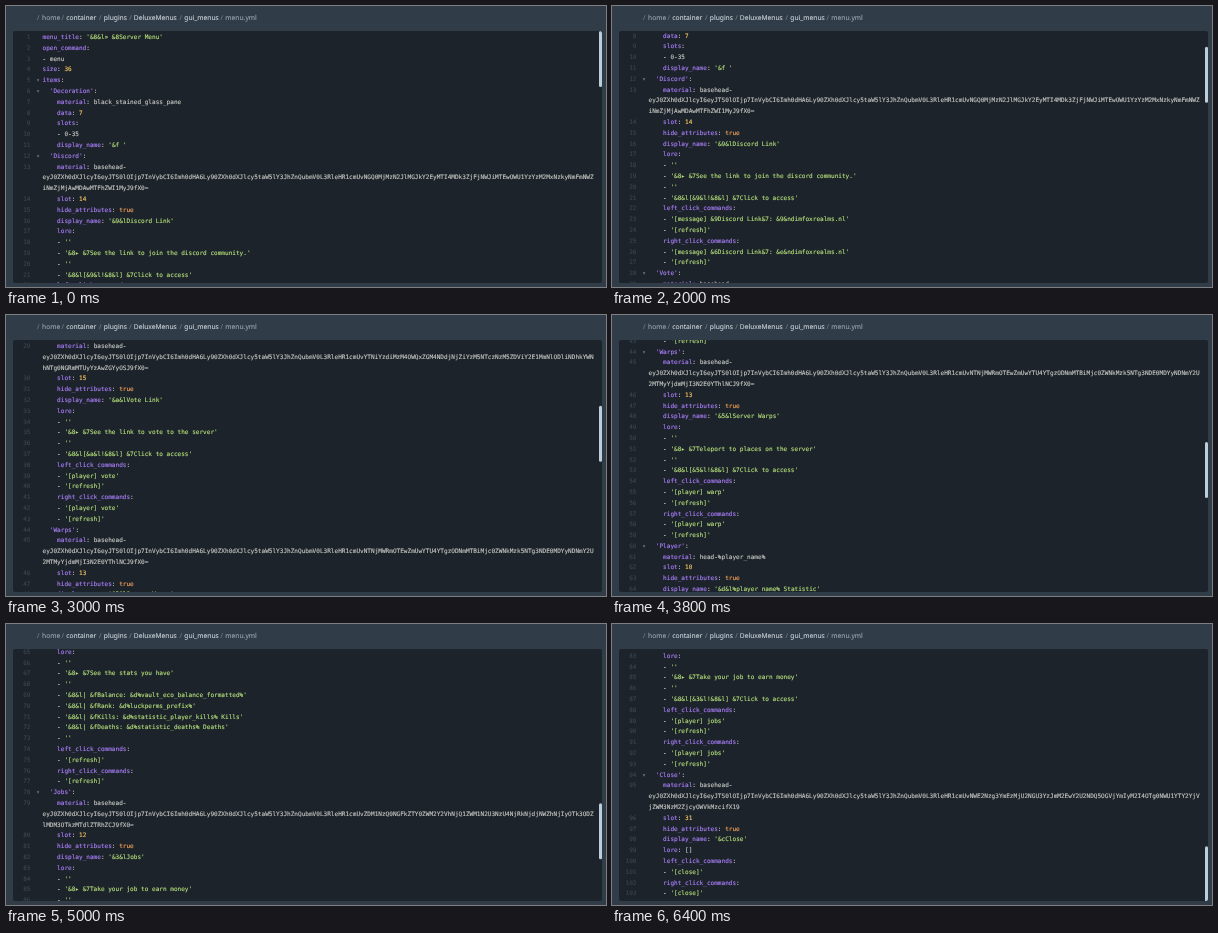
Write an HTML page that moves like this. It is 600 by 281 pixels and loops after 6600 ms.

```html
<!DOCTYPE html>
<html lang="en">
<head>
<meta charset="utf-8">
<title>menu.yml</title>
<style>
  @property --scroll { syntax: "<number>"; inherits: true; initial-value: 0; }

  html, body { margin: 0; width: 100%; height: 100%; overflow: hidden; background: #303c47; }

  #stage {
    position: relative; width: 600px; height: 281px; overflow: hidden;
    background: #303c47; text-rendering: geometricPrecision;
    -webkit-text-stroke: .12px;
    animation: scroll 6600ms infinite;
  }

  #path span {
    position: absolute; top: 7.1px; white-space: pre;
    font: 6.7px/10px "Noto Sans", "Open Sans", sans-serif; color: #cad1d8;
  }
  #path .dim { color: #97a3af; }
  #path .slash { color: #72808d; }

  #editor {
    position: absolute; left: 7px; top: 24.5px; width: 588.6px; height: 252.5px;
    overflow: hidden; border-radius: 2px; background: #1c232b;
  }
  #code {
    padding-top: 2.6px;
    font: 6.07px/10.8px "DejaVu Sans Mono", monospace; color: #cbccc6;
    transform: translateY(calc(var(--scroll) * -1px));
  }
  .row { position: relative; height: 10.8px; padding-left: 29.5px; white-space: pre; }
  .num { position: absolute; left: 0; width: 17.5px; text-align: right; color: #3b4650; }
  .fold { position: absolute; left: 23.2px; color: #707b84; }
  .late { animation: appear 6600ms step-end infinite; }
  .key { color: #ae81ff; }
  .str { color: #bae67e; }
  .int { color: #ffcc66; }
  .bool { color: #ffa759; }

  #thumb {
    position: absolute; right: 0; top: .9px; width: 3px; height: 55.3px;
    border-radius: 1.5px; background: #bccedb;
    transform: translateY(calc(var(--scroll) * .203px));
  }

  /* The view advances once every 100 ms. */
  @keyframes scroll {
    0%       { --scroll: 0; animation-timing-function: step-end; }
    19.6969% { --scroll: 0; animation-timing-function: steps(4); }
    25.7575% { --scroll: 27; animation-timing-function: steps(3); }
    30.3030% { --scroll: 77.3; animation-timing-function: steps(10); }
    45.4545% { --scroll: 324; animation-timing-function: steps(8); }
    57.5757% { --scroll: 502; animation-timing-function: steps(8); }
    69.6969% { --scroll: 659; animation-timing-function: steps(8); }
    81.8181% { --scroll: 860; animation-timing-function: steps(5); }
    89.3939%, 100% { --scroll: 971.3; animation-timing-function: step-end; }
  }
  @keyframes appear {
    0% { opacity: 0; }
    50%, 100% { opacity: 1; }
  }
</style>
</head>
<body>
<div id="stage">
  <div id="path"></div>
  <div id="editor">
    <div id="code"></div>
    <div id="thumb"></div>
  </div>
</div>
<script>
  const skinStart = "eyJ0ZXh0dXJlcyI6eyJTS0lOIjp7InVybCI6Imh0dHA6Ly90ZXh0dXJlcy5taW5lY3JhZnQubmV0L3RleHR1cmUv";
  const site = "dimfoxrealms.nl";

  // "~" marks the continuation of a wrapped line.
  const skin = (first, rest) => ["material: basehead-", "~" + skinStart + first, "~" + rest];
  const base = (slot, name) => [`slot: ${slot}`, "hide_attributes: true", `display_name: '${name}'`];
  const list = (key, ...values) => [`${key}:`, ...values.map(v => `- '${v}'`)];
  const lore = (text, color) =>
    list("lore", "", `&8▸ &7${text}`, "", `&8&l[&${color}&l!&8&l] &7Click to access`);
  const clicks = (left, right = left) => [
    ...list("left_click_commands", ...left),
    ...list("right_click_commands", ...right)
  ];
  const item = (name, ...parts) => [
    `  '${name}':`,
    ...parts.flat().map(s => s[0] === "~" ? s : "    " + s)
  ];
  const run = command => clicks([`[player] ${command}`, "[refresh]"]);

  const lines = [
    "menu_title: '&8&l» &8Server Menu'",
    "open_command:",
    "- menu",
    "size: 36",
    "items:",
    ...item("Decoration", "material: black_stained_glass_pane", "data: 7",
      "slots:", "- 0-35", "display_name: '&f '"),
    ...item("Discord",
      skin("NGQ0MjMzN2JlMGJkY2EyMTI4MDk3ZjFjNWJiMTEwOWU1YzYzM2MxNzkyNmFmNWZ",
        "iNmZjMjAwMDAwMTFhZWI1MyJ9fX0="),
      base(14, "&9&lDiscord Link"),
      lore("See the link to join the discord community.", 9),
      clicks([`[message] &9Discord Link&7: &9&n${site}`, "[refresh]"],
        [`[message] &6Discord Link&7: &e&n${site}`, "[refresh]"])),
    ...item("Vote",
      skin("YTNiYzdiMzM4OWQxZGM4NDdjNjZiYzM5NTczNzM5ZDViY2E1MmNlODliNDhkYWN",
        "hNTg0NGRmMTUyYzAwZGYyOSJ9fX0="),
      base(15, "&a&lVote Link"),
      lore("See the link to vote to the server", "a"),
      run("vote")),
    ...item("Warps",
      skin("NTNjMWRmOTEwZmUwYTU4YTgzODNmMTBiMjc0ZWNkMzk5NTg3NDE0MDYyNDNmY2U",
        "2MTMyYjdmMjI3N2E0YThlNCJ9fX0="),
      base(13, "&5&lServer Warps"),
      lore("Teleport to places on the server", 5),
      run("warp")),
    ...item("Player", "material: head-%player_name%",
      base(10, "&d&l%player_name% Statistic"),
      list("lore", "", "&8▸ &7See the stats you have", "",
        "&8&l| &fBalance: &d%vault_eco_balance_formatted%",
        "&8&l| &fRank: &d%luckperms_prefix%",
        "&8&l| &fKills: &d%statistic_player_kills% Kills",
        "&8&l| &fDeaths: &d%statistic_deaths% Deaths", ""),
      clicks(["[refresh]"])),
    ...item("Jobs",
      skin("ZDM1NzQ0NGFkZTY0ZWM2Y2VhNjQ1ZWM1N2U3NzU4NjRkNjdjNWZhNjIyOTk3ODZ",
        "lMDM3OTkzMTdlZTRhZCJ9fX0="),
      base(12, "&3&lJobs"),
      lore("Take your job to earn money", 3),
      run("jobs")),
    ...item("Close",
      skin("NWE2Nzg3YmEzMjU2NGU3YzJmM2EwY2U2NDQ5OGVjYmIyM2I4OTg0NWU1YTY2YjV",
        "jZWM3NzM2ZjcyOWVkMzcifX19"),
      base(31, "&cClose"), "lore: []", clicks(["[close]"]))
  ];

  function add(parent, tag, cls, text = "") {
    const el = document.createElement(tag);
    el.className = cls;
    el.textContent = text;
    parent.append(el);
    return el;
  }

  function valueClass(value) {
    if (value[0] === "'") return "str";
    if (/^\d+$/.test(value)) return "int";
    return value === "true" ? "bool" : "";
  }

  const code = document.getElementById("code");
  let number = 0;
  for (const line of lines) {
    const row = add(code, "div", "row");
    if (line[0] === "~") {
      row.textContent = line.slice(1);
      continue;
    }
    add(row, "span", "num", ++number);
    if (line === "items:" || /^  '/.test(line))
      add(row, "span", line.includes("Warps") ? "fold late" : "fold", "▾");
    const [, indent, key, colon, value] = line.match(/^(\s*(?:- )?)(?:('?\w+'?)(:\s*))?(.*)$/);
    row.append(indent);
    if (key) {
      add(row, "span", "key", key);
      row.append(colon);
    }
    add(row, "span", valueClass(value), value);
  }

  const path = document.getElementById("path");
  const crumbs = [
    [31, 36, "home"], [55.6, 60.3, "container"], [93, 97.8, "plugins"],
    [123.3, 127.8, "DeluxeMenus"], [173.4, 178.3, "gui_menus"], [214.4, 219.3, "menu.yml"]
  ];
  crumbs.forEach(([slashX, x, name], i) => {
    add(path, "span", "slash", "/").style.left = slashX + "px";
    add(path, "span", i % 5 ? "" : "dim", name).style.left = x + "px";
  });
</script>
</body>
</html>
```
